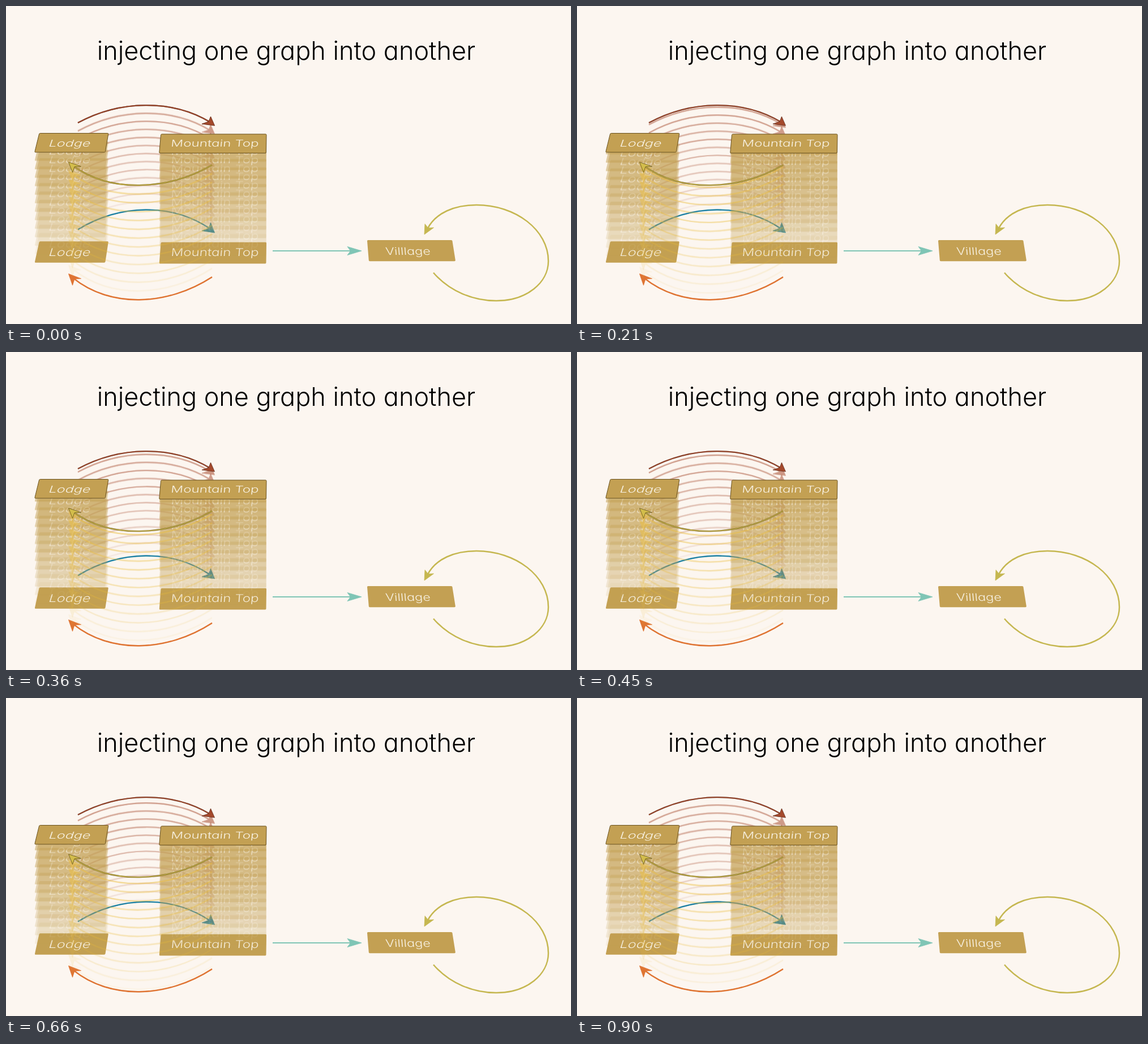
Write an HTML page that moves like this. It is 998 px wide and 561 px high and loops after 0.93 s.

```html
<!DOCTYPE html>
<html lang="en">
<head>
<meta charset="utf-8">
<title>Graph injection</title>
<style>
html, body { margin: 0; height: 100%; overflow: hidden; background: #fcf6f0; }
svg { display: block; width: 100vw; height: 100vh; }
text { font-family: Inter, Lato, sans-serif; font-weight: 300; font-feature-settings: "cv11", "ss03"; text-anchor: middle; }
.label { font-size: 22px; fill: #f8f1e2; }
.box { fill: #c3a053; stroke: var(--rim, none); stroke-linejoin: round; }
.line { fill: none; stroke-width: 2.2; }
.up { --ink: var(--upper); --edge: var(--upperEdge, var(--upper)); }
.down { --ink: var(--lower); --edge: var(--lowerEdge, var(--lower)); }
.edge { stroke: var(--edge); }
.core { stroke: var(--ink); stroke-width: 1.2; }
.head { fill: var(--ink); stroke: var(--edge); stroke-width: .8; }
#base { --upper: #1f83a5; --lower: #df7433; }
#ghosts { --upper: #a5492c; --lower: #ebbd3c; }
#front { --upper: #a5492c; --upperEdge: #65301f; --lower: #d3bd4b; --lowerEdge: #66551c; --rim: #69511f; }
.teal { --ink: #7fc5b5; --edge: #7fc5b5; }
.olive { --ink: #c5b750; --edge: #c5b750; }
.olive .line { stroke-width: 2.5; }
</style>
</head>
<body>
<svg viewBox="0 0 998 561">
  <defs>
    <g id="graph">
      <g class="up">
        <path class="line edge" d="M127 206C202 165.500 293 164.500 360 204.500"/>
        <path class="line core" d="M127 206C202 165.500 293 164.500 360 204.500"/>
        <path class="head" d="M368.500 211L346 208L358 204L361.500 195Z"/>
      </g>
      <path class="box" d="M60.500 224.500H179.500Q181 224.500 180.700 226L175.500 256.500Q175 258 173.500 258H52Q50.500 258 51 256.500L58.500 226Q59 224.500 60.500 224.500Z"/>
      <path class="box" d="M275.500 226H458.500Q460 226 460 227.500L459.500 258Q459.500 259.500 458 259.500H272Q270.500 259.500 270.800 258L273.500 227.500Q273.700 226 275.500 226Z"/>
      <text class="label" transform="translate(111 247.500) scale(1.14 .76) skewX(-13)">Lodge</text>
      <text class="label" transform="translate(368.500 247.500) scale(1.1 .76) skewX(-4)">Mountain Top</text>
      <g class="down">
        <path class="line edge" d="M364 280.500C284 326.500 184 329 119 282.500"/>
        <path class="line core" d="M364 280.500C284 326.500 184 329 119 282.500"/>
        <path class="head" d="M110.500 275.500L132.500 283L121 283.500L117.500 293.500Z"/>
      </g>
    </g>
  </defs>

  <text x="495" y="95" font-size="45">injecting one graph into another</text>

  <g class="teal">
    <path class="line edge" d="M471 432H610"/>
    <path class="head" d="M628 432L603 424.500L608.500 432L603 439.500Z"/>
  </g>
  <g class="olive">
    <path class="line edge" d="M755 470.500C784 504 826 520 866 520C920 520 958 488 958 450C958 395 900 351 831 351C792 351 759 365 744.500 393"/>
    <path class="head" d="M739 403L740 384.500L745.500 391.500L755.500 391Z"/>
  </g>
  <path class="box" d="M639.500 413H786.500Q788 413 788.400 414.500L793.800 448.500Q794 450.300 792 450.300H642.500Q641 450.300 640.800 448.500L638 414.500Q638 413 639.500 413Z"/>
  <text class="label" transform="translate(710.500 438.500) scale(1.07 .83) skewX(4)">Villlage</text>

  <use id="base" href="#graph"/>
  <g id="ghosts"></g>
  <use id="front" href="#graph"/>
</svg>
<script>
const LOOP = 930, STEP = 30, COUNT = 13;
const layer = document.getElementById("ghosts");

// Vertical drop from the front graph (p = 0) to the base graph (p = 1)
function drop(el, p) {
  el.setAttribute("transform", `matrix(1 0 0 ${1 + .124 * p} 0 ${162.8 * p})`);
}

const ghosts = Array.from({ length: COUNT }, () => {
  const ghost = document.createElementNS("http://www.w3.org/2000/svg", "use");
  ghost.setAttribute("href", "#graph");
  layer.prepend(ghost);
  return ghost;
});

function draw(now) {
  const phase = Math.floor(now % LOOP / STEP) * STEP / LOOP;
  ghosts.forEach((ghost, i) => {
    const p = (i + phase) / COUNT;
    drop(ghost, p);
    ghost.setAttribute("opacity", .56 * (1 - p) ** .65);
  });
  requestAnimationFrame(draw);
}

drop(document.getElementById("base"), 1);
draw(performance.now());
</script>
</body>
</html>
```
